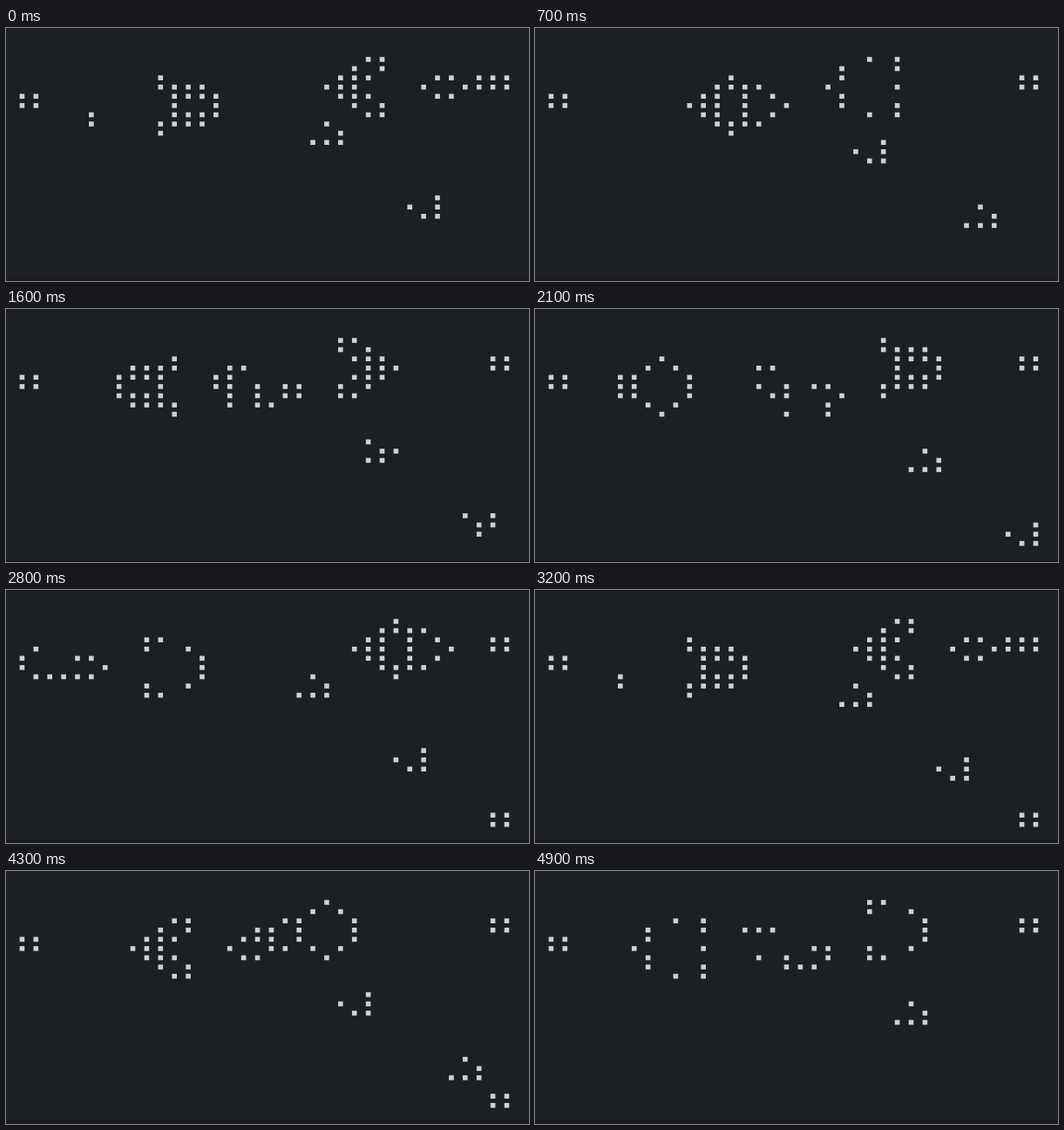
These frames come from a looping animation (600 by 290 pixels, 5000 ms). An HTML page with a canvas:

```html
<!DOCTYPE html>
<html lang="en">
<head>
<meta charset="utf-8">
<title>Glider gun</title>
<style>
  html, body { margin: 0; width: 100%; height: 100%; overflow: hidden; background: #1c1f23; }
  canvas { display: block; }
</style>
</head>
<body>
<canvas id="stage" width="600" height="290"></canvas>
<script>
const COLS = 36, ROWS = 23;
const LOOP = 5000, TICK = 100;
const HOLDS = [4, 22, 42];          // ticks on which the picture stands still
const WARM_UP = 53;                 // generations before the loop begins
const COUNT = LOOP / TICK - HOLDS.length;
const X0 = 18.45, Y0 = 36, DX = 15.886, DY = 10.577, SIZE = 5.6;

// Live columns of the gun, row by row
const GUN = [
  [24],
  [22, 24],
  [12, 13, 20, 21, 34, 35],
  [11, 15, 20, 21, 34, 35],
  [0, 1, 10, 16, 20, 21],
  [0, 1, 10, 14, 16, 17, 22, 24],
  [10, 16, 24],
  [11, 15],
  [12, 13]
];

const makeGrid = rule =>
  Array.from({ length: ROWS }, (_, r) => Array.from({ length: COLS }, (_, c) => rule(r, c)));

function neighbours(grid, r, c) {
  let n = 0;
  for (let y = r - 1; y <= r + 1; y++)
    for (let x = c - 1; x <= c + 1; x++)
      if ((y !== r || x !== c) && grid[y]?.[x]) n++;
  return n;
}

// One generation of Life; everything outside the grid is dead
const step = grid => makeGrid((r, c) => {
  const n = neighbours(grid, r, c);
  return n === 3 || (n === 2 && grid[r][c]);
});

let grid = makeGrid((r, c) => !!GUN[r]?.includes(c));
for (let i = 0; i < WARM_UP; i++) grid = step(grid);

const generations = [];
for (let i = 0; i < COUNT; i++) {
  generations.push(grid);
  grid = step(grid);
}

const ctx = document.getElementById('stage').getContext('2d');

function draw(cells) {
  ctx.fillStyle = '#1c1f23';
  ctx.fillRect(0, 0, 600, 290);
  ctx.fillStyle = '#1a1b1e';
  ctx.fillRect(0, 287, 600, 3);
  ctx.fillStyle = '#d0d0d0';
  cells.forEach((row, r) => row.forEach((alive, c) => {
    if (alive) ctx.fillRect(X0 + c * DX - SIZE / 2, Y0 + r * DY - SIZE / 2, SIZE, SIZE);
  }));
}

function generationAt(ms) {
  const tick = Math.floor((ms % LOOP) / TICK);
  return tick - HOLDS.filter(h => h <= tick).length;
}

let shown = -1;
const start = performance.now();

function frame() {
  const g = generationAt(performance.now() - start);
  if (g !== shown) draw(generations[shown = g]);
  requestAnimationFrame(frame);
}
frame();
</script>
</body>
</html>
```
